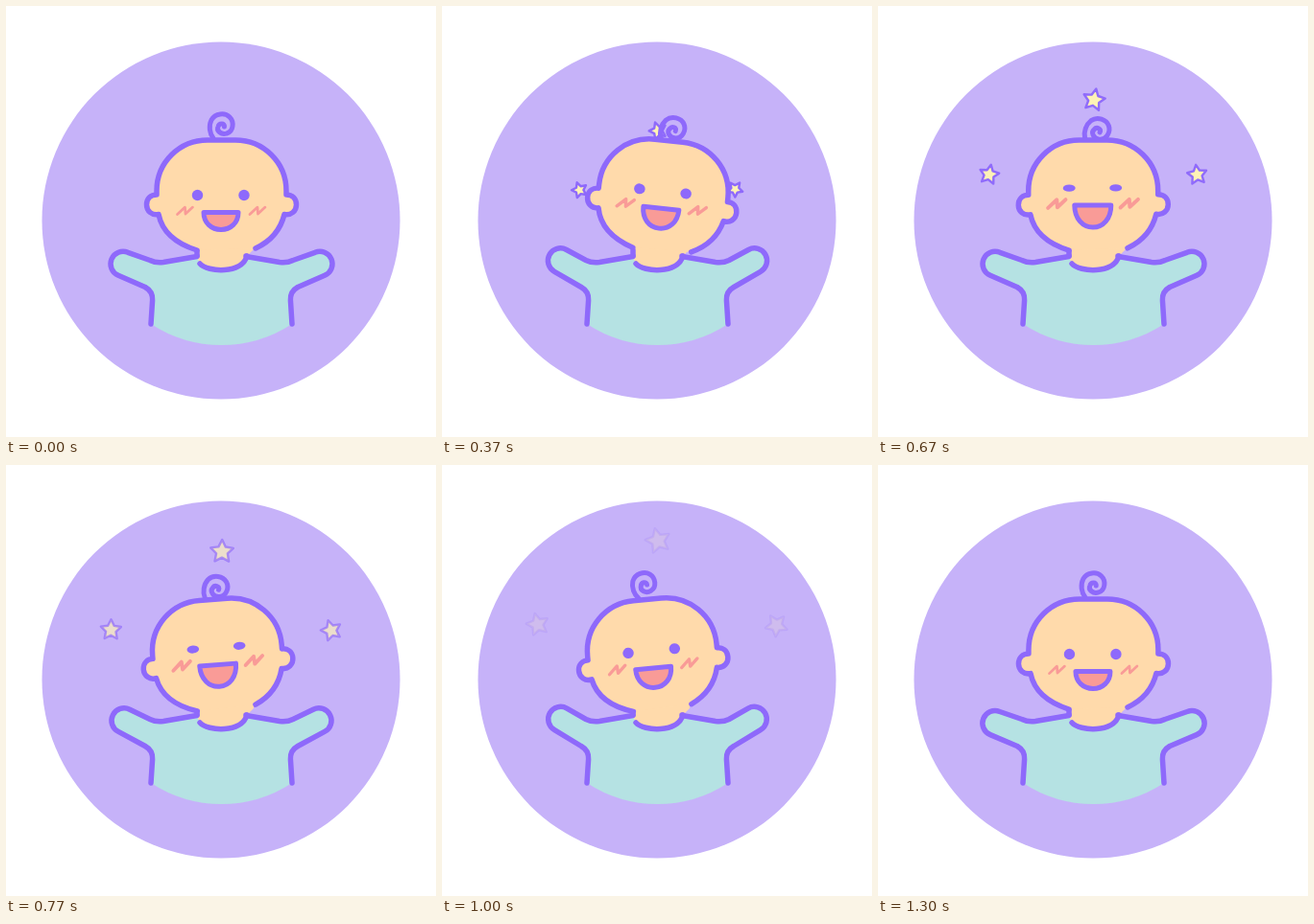
These frames come from a looping animation (448x450 px, 1330 ms). An HTML page with a canvas:

```html
<!DOCTYPE html>
<html lang="en">
<head>
<meta charset="utf-8">
<title>Happy baby</title>
<style>
  html, body { margin: 0; height: 100%; overflow: hidden; background: #fff; }
  canvas { display: block; }
</style>
</head>
<body>
<canvas id="stage" width="448" height="450"></canvas>
<script>
const ctx = document.getElementById('stage').getContext('2d');
const LOOP = 1330, BEATS = 40, MID = 224.5;
const PURPLE = '#8e69fb', LILAC = '#c6b2f9', SKIN = '#ffdaab';
const MINT = '#b5e2e3', PINK = '#f99b97', CREAM = '#fff3b5';

// Keys are [beat, value]; each span eases in and out.
const HEAD_TILT = [[0, 0], [13.33, 6.5], [26.67, -6.5], [40, 0]];
const CURL_TILT = [[0, 0], [20, 26], [32, -10], [40, 0]];
const ARM_LIFT = [[0, 0], [5.5, 7], [10.5, 7], [14.5, -7.5], [20, 0]];

// End position, travel factor per axis, radius, resting angle.
const STARS = [
  { x: 97, y: 165, dx: 0.075, dy: 0.044, r: 12, turn: -18 },
  { x: 225, y: 76, dx: 0, dy: 0.088, r: 13.5, turn: -18 },
  { x: 351, y: 166, dx: -0.074, dy: 0.041, r: 12, turn: -36 }
];

const HEAD = new Path2D('M199 255C180 249 163 238 159 217.5C152 219 146.5 214 146.5 207.5' +
  'C146.5 201 151 197 157 197V193C157 163 181 140 210 140H239C268 140 292 163 292 193V197' +
  'C298 197 302.5 201 302.5 207.5C302.5 214 297 219 290 217.5C286 234 275 246 260 253');
const CURL = new Path2D('M216 138C212 133 211 125 214 119C218 112 228 111 233 116' +
  'C238 121 237 131 230 133C224 135 219 130 221 126C222 122 228 122 227.5 126');
const NECK = new Path2D('M199 240V262L202 269C210 278 246 280 251 261L258 254V240Z');
const COLLAR = new Path2D('M202 269C210 278 246 280 251 261');
const ZIGZAG = new Path2D('M-8 3.8L0 -3.7L.5 3.3L8 -3.7');

const rad = deg => deg * Math.PI / 180;

function ease(keys, beat) {
  const i = keys.findIndex(key => key[0] > beat);
  const [b0, v0] = keys[i - 1], [b1, v1] = keys[i];
  return v0 + (v1 - v0) * (1 - Math.cos(Math.PI * (beat - b0) / (b1 - b0))) / 2;
}

function stroke(path, width = 5.5, color = PURPLE) {
  ctx.lineWidth = width;
  ctx.strokeStyle = color;
  ctx.stroke(path);
}

function fill(path, color) {
  ctx.fillStyle = color;
  ctx.fill(path);
}

function layer(draw) {
  ctx.save();
  draw();
  ctx.restore();
}

function rotateAbout(x, y, deg) {
  ctx.translate(x, y);
  ctx.rotate(rad(deg));
  ctx.translate(-x, -y);
}

function mirrored(draw) {
  draw();
  layer(() => {
    ctx.translate(2 * MID, 0);
    ctx.scale(-1, 1);
    draw();
  });
}

function drawStar(star, beat) {
  const left = Math.max(0, 36 - beat);
  const rest = (left / 36) ** 2;
  const outer = star.r * (1 - 0.65 * rest);
  const path = new Path2D();
  for (let i = 0; i < 10; i++) {
    const a = rad(i * 36 - 90), r = i % 2 ? outer * 0.5 : outer;
    path.lineTo(r * Math.cos(a), r * Math.sin(a));
  }
  path.closePath();
  layer(() => {
    ctx.globalAlpha = Math.min(1, left / 16) ** 1.8;
    ctx.translate(star.x + star.dx * left ** 2, star.y + star.dy * left ** 2);
    ctx.rotate(rad(star.turn + 150 * rest));
    fill(path, CREAM);
    stroke(path, 2.4);
  });
}

function sleeve(lift) {
  const c = Math.cos(rad(lift)), s = Math.sin(rad(lift));
  const turn = (x, y) => [155 + (x - 155) * c - (y - 281) * s, 281 + (x - 155) * s + (y - 281) * c];
  const top = turn(127, 257.3), low = turn(117, 281.3);
  return `M151 332L152.6 307Q153 298 145 293.5L${low}A13 13 0 0 1 ${top}` +
    'L150 265.5Q156 268.5 164 267.5L199 261.5';
}

function drawBody(beat) {
  const edge = sleeve(ease(ARM_LIFT, beat % 20));
  const half = new Path2D(edge + 'H226V354H224.5Q184.5 354 151 332Z');
  const outline = new Path2D(edge + 'V261');
  mirrored(() => fill(half, MINT));
  fill(NECK, SKIN);
  mirrored(() => stroke(outline));
  stroke(COLLAR);
  stroke(new Path2D('M199 261V255'));
}

function drawFace(joy) {
  ctx.translate(0, -7.5 * joy);
  const squint = joy ** 4;
  for (const x of [199.5, 248]) {
    const eye = new Path2D();
    eye.ellipse(x, 197.5, 5.7 + 0.8 * squint, 5.7 - 2.1 * squint, 0, 0, 7);
    fill(eye, PURPLE);
  }
  for (const x of [186.5, 262]) {
    layer(() => {
      ctx.translate(x, 213.8);
      ctx.scale(1 + 0.15 * joy, 1 + 0.15 * joy);
      stroke(ZIGZAG, 2.7 + 0.7 * joy, PINK);
    });
  }
  const w = 18 + joy, h = 18 + 5 * joy;
  const mouth = new Path2D(`M${224 - w} 215.5h${2 * w}c0 ${h * 0.62} ${-w * 0.45} ${h} ${-w} ${h}` +
    `s${-w} ${-h * 0.38} ${-w} ${-h}z`);
  fill(mouth, PINK);
  stroke(mouth, 5);
}

function drawHead(beat) {
  rotateAbout(224, 252, ease(HEAD_TILT, beat));
  layer(() => {
    rotateAbout(217, 138, ease(CURL_TILT, beat));
    stroke(CURL, 5);
  });
  fill(HEAD, SKIN);
  stroke(HEAD);
  drawFace((1 - Math.cos(2 * Math.PI * beat / BEATS)) / 2);
}

function render(now) {
  const beat = (now % LOOP) / LOOP * BEATS;
  ctx.clearRect(0, 0, 448, 450);
  ctx.lineCap = ctx.lineJoin = 'round';
  const disc = new Path2D();
  disc.arc(224, 224, 186.5, 0, 7);
  fill(disc, LILAC);
  STARS.forEach(star => drawStar(star, beat));
  drawBody(beat);
  layer(() => drawHead(beat));
}

const start = performance.now();
(function tick() {
  render(performance.now() - start);
  requestAnimationFrame(tick);
})();
</script>
</body>
</html>
```
